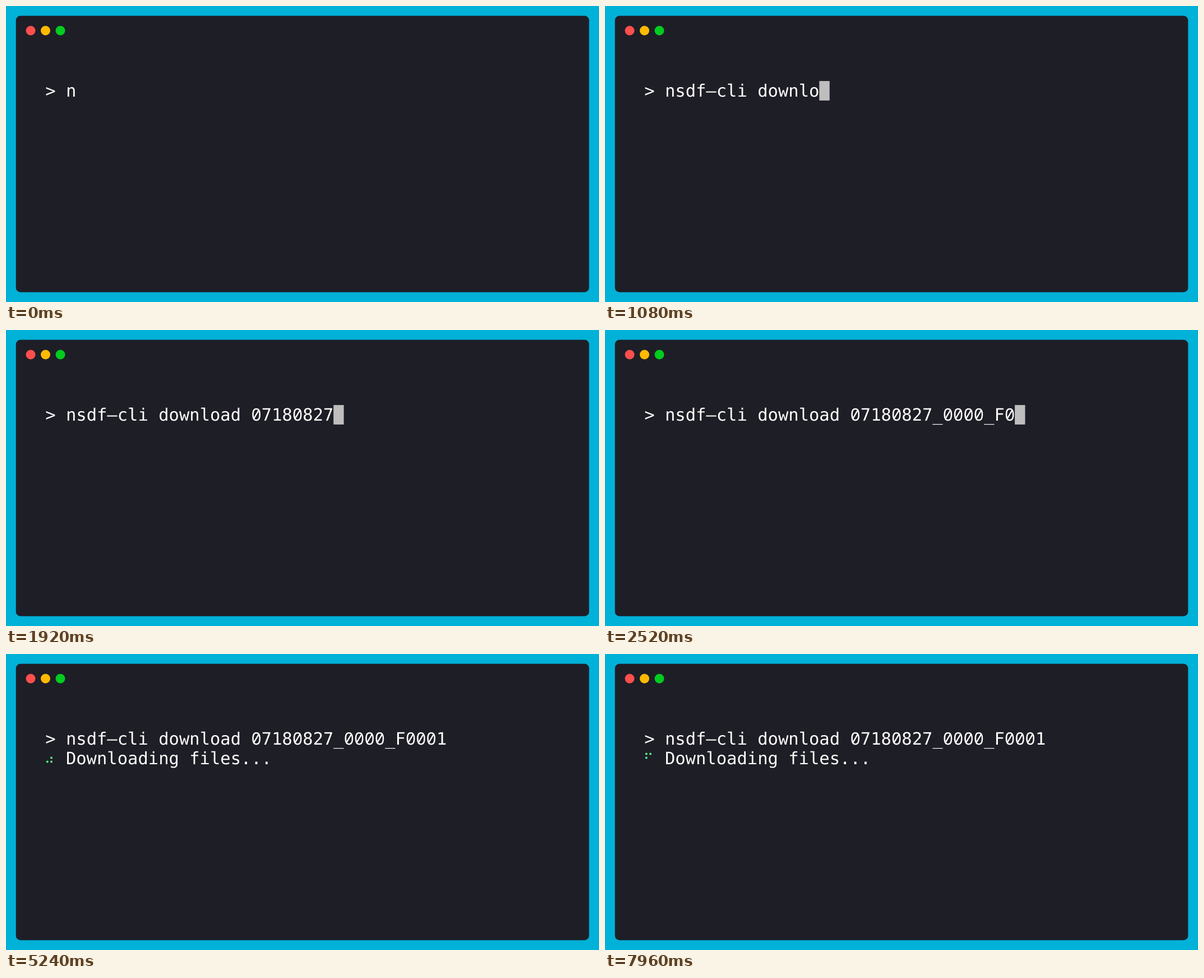
Recreate the animation shown at these times as an HTML page. Size 1058x529 px, loop 8 s.

```html
<!DOCTYPE html>
<html lang="en">
<head>
<meta charset="utf-8">
<title>Terminal download</title>
<style>
  html, body { margin: 0; width: 100%; height: 100%; overflow: hidden; background: #00b2d8; }
  svg { display: block; width: 1058px; height: 529px; }
  text {
    font: 30.5px "DejaVu Sans Mono", monospace;
    fill: #fffefa;
    white-space: pre;
    text-rendering: geometricPrecision;
  }
  .zero { font: 30.6px "Noto Sans Mono", monospace; }
  #cursor { fill: #bfbdbe; }
  #spinner { fill: #5af78e; }
</style>
</head>
<body>
<svg viewBox="0 0 1058 529">
  <rect x="17.7" y="17.6" width="1022.6" height="493.8" rx="8" fill="#1e1e27"/>
  <circle cx="44" cy="44" r="8.5" fill="#ff4f4d"/>
  <circle cx="70.5" cy="44" r="8.5" fill="#febb00"/>
  <circle cx="97" cy="44" r="8.5" fill="#00cc1d"/>
  <text id="line" x="70.2" y="162"></text>
  <text id="status" x="106.9" y="196.8">Downloading files...</text>
  <g id="spinner"></g>
  <rect id="cursor" width="18.4" height="34.8"/>
</svg>
<script>
  const LOOP = 8000, TICK = 40, X0 = 70.2, CELL = 18.36;
  const COMMAND = "nsdf–cli download 07180827_0000_F0001";
  // Braille dot masks: bits 0-2 are the left column, 3-5 the right one.
  const SPIN = [0x0b, 0x19, 0x39, 0x38, 0x3c, 0x34, 0x26, 0x27, 0x07, 0x0f];
  const CURSOR_OFF = 3320, ENTER = 3800, BUSY = 4080;

  const [line, status, spinner, cursor] =
    ["line", "status", "spinner", "cursor"].map(id => document.getElementById(id));

  const dots = SPIN.slice(0, 6).map((_, i) => {
    const dot = document.createElementNS("http://www.w3.org/2000/svg", "circle");
    dot.setAttribute("cx", i < 3 ? 73.8 : 81);
    dot.setAttribute("cy", 178.6 + (i % 3) * 6.9);
    dot.setAttribute("r", 2);
    return spinner.appendChild(dot);
  });

  const show = (el, on) => el.setAttribute("visibility", on ? "inherit" : "hidden");

  // Last n whose moment, rate * n + shift ticks, has been reached.
  const count = (tick, rate, shift) => Math.ceil((tick + 1 - shift) / rate) - 1;

  let shown = -1;
  function type(n) {
    if (n === shown) return;
    shown = n;
    line.innerHTML = "&gt; " + COMMAND.slice(0, n).replace(/0/g, '<tspan class="zero">0</tspan>');
  }

  function draw(ms) {
    const tick = Math.floor(ms / TICK);
    const typed = Math.min(COMMAND.length, Math.max(1, count(tick, 1.88, -0.66)));
    type(typed);

    const entered = ms >= ENTER, busy = ms >= BUSY;
    show(cursor, tick > 0 && (ms < CURSOR_OFF || entered) && !busy);
    cursor.setAttribute("x", entered ? X0 : X0 + (typed + 2) * CELL);
    cursor.setAttribute("y", entered ? 168.9 : 134.1);

    show(status, busy);
    show(spinner, busy);
    if (!busy) return dots.forEach(dot => show(dot, false));
    // The spinner redraws every 104 ms but advances every 80 ms, so it skips steps.
    const redraw = count(tick - BUSY / TICK, 2.485, 0.1);
    const mask = SPIN[Math.floor(redraw * 1.3 + 1e-6) % SPIN.length];
    dots.forEach((dot, i) => show(dot, mask >> i & 1));
  }

  const start = performance.now();
  function frame() {
    draw((performance.now() - start) % LOOP);
    requestAnimationFrame(frame);
  }
  frame();
</script>
</body>
</html>
```
